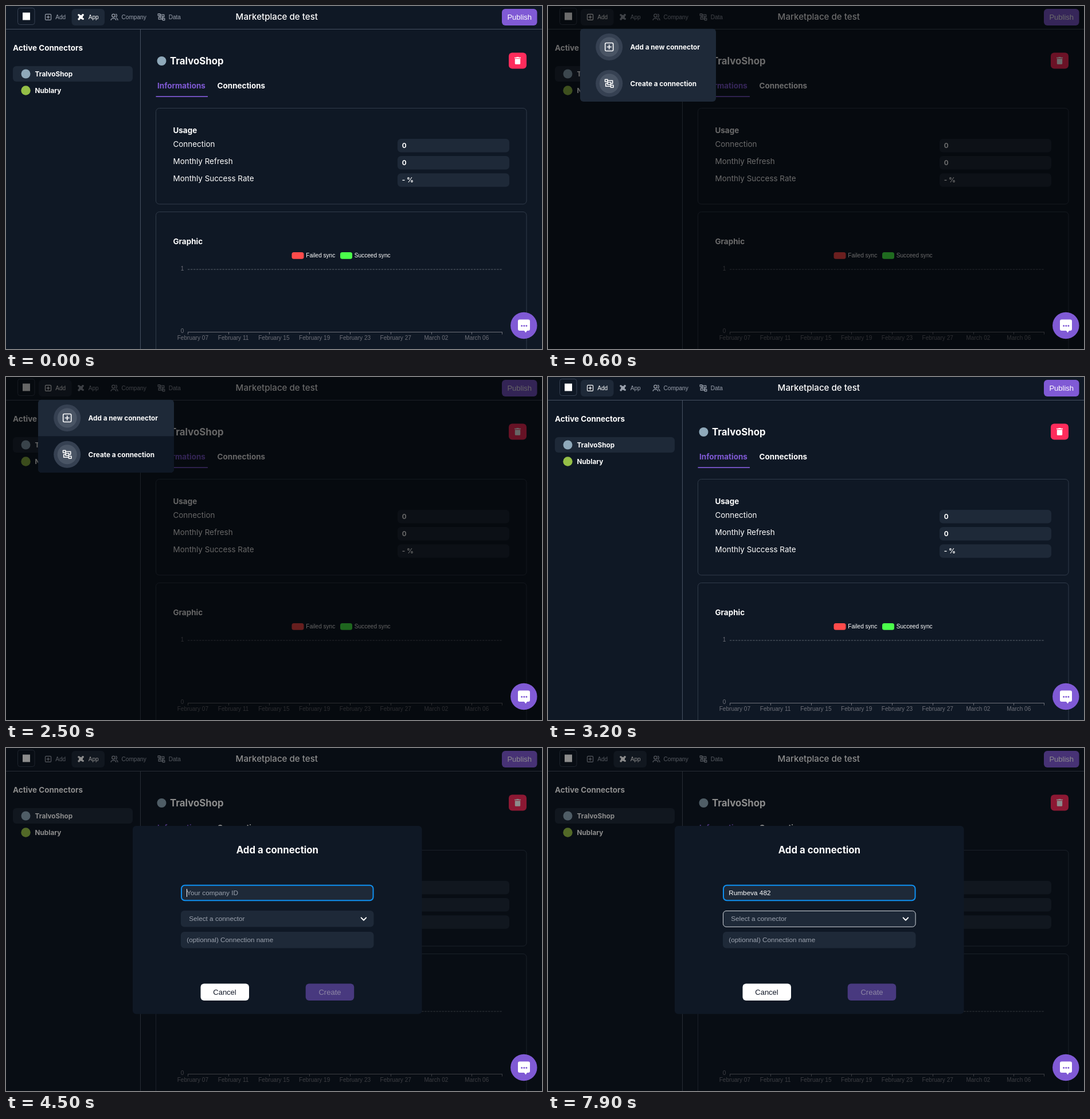
Write an HTML page that moves like this. It is 935 by 599 pixels and loops after 8000 ms.

```html
<!DOCTYPE html>
<html lang="en">
<head>
<meta charset="utf-8">
<title>Connector dashboard</title>
<style>
html, body { margin: 0; width: 100%; height: 100%; overflow: hidden; background: #0f1825; }
svg { display: block; }
text { fill: #fff; white-space: pre; font-family: Inter, sans-serif; font-size: 13.44px; }
.b { font-weight: 700; }
.s { font-size: 11.76px; }
.h { font-size: 16.8px; }
.a { font-family: "Liberation Sans", Arial, sans-serif; }
.t { font-size: 10.08px; }
.btn { font-size: 13px; text-anchor: middle; }
.ph { fill: #9ca3af; }
.axis { fill: #6e7079; }
.mid { text-anchor: middle; }
.end { text-anchor: end; }
.panel { fill: #1e2938; }
.card { fill: none; stroke: #303b4a; }
.line { fill: none; stroke: currentColor; stroke-linejoin: round; stroke-linecap: round; }
.nav text { fill: currentColor; }
</style>
</head>
<body>
<svg width="935" height="599" viewBox="0 0 935 599">
  <defs>
    <g id="plus" class="line">
      <rect x="1" y="1" width="14" height="14" rx="2"/>
      <path d="M8 4.5V11.5M4.5 8H11.5"/>
    </g>
    <g id="flow" class="line">
      <rect x="0.8" y="1" width="4.4" height="4"/>
      <rect x="5.4" y="6" width="5.4" height="4"/>
      <rect x="10.8" y="11" width="4.4" height="4"/>
      <path d="M5.4 3H14V8H11M10.6 13H2V8H5.2"/>
    </g>
    <clipPath id="menuClip"><rect x="56" y="39.5" width="237" height="127.5" rx="6"/></clipPath>
  </defs>

  <rect width="935" height="599" fill="#0f1825"/>
  <path d="M0 40.5H935M234.5 41V599" stroke="#465161" fill="none"/>

  <rect x="20.5" y="3.5" width="29.5" height="29" rx="4" fill="none" stroke="#364152"/>
  <rect x="29" y="11.5" width="13" height="13" fill="#fff"/>

  <rect id="tabBg" class="panel" y="5" width="57.5" height="29" rx="6"/>
  <g class="nav">
    <g id="navAdd">
      <use href="#plus" transform="translate(67.8 13.6) scale(.72)" stroke-width="1.6"/>
      <text class="a t" x="86.3" y="22.8">Add</text>
    </g>
    <g id="navApp">
      <g transform="translate(130.6 19.2)" fill="currentColor">
        <rect x="-3.4" y="-3.4" width="6.8" height="6.8" rx="1" transform="rotate(8)"/>
        <circle cx="-3.6" cy="-3.4" r="1.8"/><circle cx="3.4" cy="-3.6" r="1.9"/>
        <circle cx="3.6" cy="3.3" r="1.7"/><circle cx="-3.4" cy="3.6" r="1.9"/>
      </g>
      <text class="a t" x="143.8" y="22.8">App</text>
    </g>
    <g color="#9aa1ad">
      <g class="line" stroke-width="1.3">
        <circle cx="187.5" cy="16.8" r="2.7"/>
        <path d="M183.2 24.4C183.2 20.6 191.8 20.6 191.8 24.4M191.8 14.2A2.8 2.8 0 0 1 191.8 19.3M192.6 21Q195 22 195 24.4"/>
      </g>
      <text class="a t" x="201.6" y="22.8">Company</text>
      <use href="#flow" transform="translate(264.6 12.8) scale(.8)" stroke-width="1.6"/>
      <text class="a t" x="283.7" y="22.8">Data</text>
    </g>
  </g>
  <text x="400.6" y="24.4" style="font-size:15.12px;font-weight:500">Marketplace de test</text>
  <rect x="865" y="5" width="61.5" height="29" rx="6" fill="#805ad5"/>
  <text class="a btn" x="895.7" y="24">Publish</text>

  <text class="b" x="12" y="78">Active Connectors</text>
  <rect class="panel" x="12" y="105" width="209" height="27" rx="6"/>
  <circle cx="34.5" cy="118.5" r="8" fill="#8fa9ba"/>
  <text class="b s" x="50.6" y="123.2">TralvoShop</text>
  <circle cx="34.5" cy="147.5" r="8.2" fill="#95bf47"/>
  <text class="b s" x="50.6" y="152">Nublary</text>

  <circle cx="271.5" cy="96" r="8" fill="#8fa9ba"/>
  <text class="b h" x="286" y="102">TralvoShop</text>
  <rect x="877" y="81.5" width="31" height="28" rx="6" fill="#ff2c5c"/>
  <path d="M887 91.2V89.8H890L890.8 89H894.2L895 89.8H898V91.2ZM887.8 92.2H897.2V100.4Q897.2 101.8 895.8 101.8H889.2Q887.8 101.8 887.8 100.4Z" fill="#fff"/>

  <text class="b" x="264" y="143.8" style="fill:#805ad5">Informations</text>
  <text class="b" x="368.6" y="143.8">Connections</text>
  <rect x="261.5" y="157.3" width="90.5" height="1.7" fill="#805ad5"/>

  <rect class="card" x="261.5" y="178.5" width="646.5" height="167.5" rx="6"/>
  <text class="b" x="291.5" y="221.6">Usage</text>
  <g id="usage"></g>

  <rect class="card" x="261.5" y="359.5" width="646.5" height="260" rx="6"/>
  <text class="b" x="291.5" y="416">Graphic</text>
  <rect x="498.5" y="430" width="21" height="11.7" rx="3.5" fill="#ff4b4b"/>
  <text class="a t" x="523.3" y="438.7">Failed sync</text>
  <rect x="583" y="430" width="21" height="11.7" rx="3.5" fill="#4bff4b"/>
  <text class="a t" x="607.8" y="438.7">Succeed sync</text>
  <text class="a t axis end" x="310.3" y="462.3">1</text>
  <text class="a t axis end" x="310.3" y="571.3">0</text>
  <path d="M317 460H865.5" stroke="#5b626d" stroke-dasharray="3.36 1.68"/>
  <path id="axis" stroke="#6e7079" fill="none"/>
  <g id="dates"></g>

  <rect id="dim" width="935" height="599" fill="#000"/>

  <g id="menu" clip-path="url(#menuClip)">
    <rect class="panel" x="56" y="39.5" width="237" height="127.5"/>
    <rect id="rowHover" x="56" width="237" height="64" fill="#0f1825"/>
    <g fill="#364152"><circle cx="106.7" cy="71.5" r="23.5"/><circle cx="106.7" cy="135.3" r="23.5"/></g>
    <g fill="#4a5565"><circle cx="106.7" cy="71.5" r="17"/><circle cx="106.7" cy="135.3" r="17"/></g>
    <g color="#fff" stroke-width="1.6">
      <use href="#plus" transform="translate(98.7 63.5)"/>
      <use href="#flow" transform="translate(98.7 127.3)"/>
    </g>
    <text class="b s" x="143.6" y="76.3">Add a new connector</text>
    <text class="b s" x="143.6" y="140.1">Create a connection</text>
  </g>

  <g id="modal">
    <rect x="221" y="136" width="504.5" height="328.5" rx="6" fill="#0f1825"/>
    <text class="b h mid" x="473.4" y="184">Add a connection</text>
    <rect class="panel" x="305" y="238.8" width="336.5" height="28.4" rx="6"/>
    <rect class="panel" x="305" y="284" width="336.5" height="28.6" rx="6"/>
    <rect class="panel" x="305" y="321" width="336.5" height="28.4" rx="6"/>
    <rect id="ring" y="0" rx="6" fill="none"/>
    <rect id="selRing" x="305.5" y="284.5" width="335.6" height="27.8" rx="5.5" fill="none" stroke="#d1d5db"/>
    <text id="entry" class="a s" x="315.3" y="257.2"></text>
    <rect id="caret" y="246" width="1" height="14" fill="#fff"/>
    <text class="a s ph" x="319.2" y="302.4">Select a connector</text>
    <path d="M619.6 296.4L623.9 300.7L628.2 296.4" fill="none" stroke="#fff" stroke-width="2" stroke-linecap="round" stroke-linejoin="round"/>
    <text class="a s ph" x="315.3" y="339.3">(optionnal) Connection name</text>
    <rect x="339.5" y="411.5" width="84.5" height="29.5" rx="6" fill="#fff"/>
    <text class="a btn" x="381.5" y="431" style="fill:#111827">Cancel</text>
    <rect x="522.7" y="411.5" width="84.5" height="29.5" rx="6" fill="#48397f"/>
    <text class="a btn" x="565" y="431" style="fill:#8f88a6">Create</text>
  </g>

  <circle cx="903.3" cy="558" r="23.2" fill="#805ad5"/>
  <path d="M896 547.5H911Q914 547.5 914 550.5V564Q914 567 911 567H909L906.5 570.5L904 567H896Q893 567 893 564V550.5Q893 547.5 896 547.5Z" fill="#fff"/>
  <g fill="#805ad5"><circle cx="899.7" cy="558.4" r="1.5"/><circle cx="903.8" cy="558.4" r="1.5"/><circle cx="907.9" cy="558.4" r="1.5"/></g>
</svg>
<script>
const LOOP = 8000;
const NAME = "Rumbeva 482";
const KEYS = [5800, 5900, 6000, 6100, 6300, 6500, 6700, 6800, 7000, 7100, 7200];
const GREY = [154, 161, 173];
const $ = id => document.getElementById(id);
const set = (id, attrs) => {
  for (const k in attrs) $(id).setAttribute(k, attrs[k]);
};
const show = (id, on) => set(id, { visibility: on ? "visible" : "hidden" });
const within = (t, a, b) => t >= a && t < b;
const tone = k => `rgb(${GREY.map(c => Math.round(c + (255 - c) * k))})`;

// value of the last [time, value] step that has been reached
const stepAt = (t, steps) => steps.reduce((v, s) => t >= s[0] ? s[1] : v, 0);

const rows = [["Connection", "0"], ["Monthly Refresh", "0"], ["Monthly Success Rate", "- %"]];
$("usage").innerHTML = rows.map(([label, value], i) => {
  const y = 30.1 * i;
  return `<text x="291.5" y="${245.5 + y}">${label}</text>
    <rect class="panel" x="683" y="${232 + y}" width="195" height="23.5" rx="6"/>
    <text class="b s" x="690.8" y="${247.9 + y}">${value}</text>`;
}).join("");

const days = ["February 07", "February 11", "February 15", "February 19",
  "February 23", "February 27", "March 02", "March 06"];
const slot = 548.5 / 31;
$("dates").innerHTML = days.map((d, i) =>
  `<text class="a t axis mid" x="${317 + slot * (4 * i + 0.5)}" y="583">${d}</text>`).join("");
const ticks = days.map((d, i) => Math.round(317 + slot * 4 * i) + 0.5).concat(865.5);
set("axis", { d: "M317 569.5H866" + ticks.map(x => `M${x} 569V573.5`).join("") });

function draw(time) {
  const t = Math.floor(time / 100) * 100;
  const adding = within(t, 600, 3300);
  const menu = within(t, 600, 3200);
  const modal = t >= 3300;

  set("tabBg", { x: adding ? 57 : 114.5 });
  const hover = stepAt(t, [[100, 0.3], [200, 0.75], [300, 1], [3300, 0]]);
  set("navAdd", { color: tone(hover) });
  set("navApp", { color: tone(adding ? 0 : 1) });
  set("dim", { opacity: stepAt(t, [[600, 0.58], [700, 0.6], [3200, 0], [3300, 0.44], [3400, 0.45]]) });

  show("menu", menu);
  show("rowHover", menu && t >= 1100);
  set("rowHover", { y: t < 2500 ? 39.5 : 103.3 });

  show("modal", modal);
  const focus = t >= 4500;
  const w = focus ? 2 : 1;
  show("ring", t >= 4400);
  set("ring", {
    x: 305 + w / 2, y: 238.8 + w / 2, width: 336.5 - w, height: 28.4 - w,
    stroke: focus ? "#0e8ff0" : "#d1d5db", "stroke-width": w, opacity: focus ? 1 : 0.6
  });
  show("selRing", t >= 7800);
  set("selRing", { opacity: t >= 7900 ? 1 : 0.5 });

  const typed = NAME.slice(0, KEYS.filter(k => t >= k).length);
  const entry = $("entry");
  entry.textContent = typed || "Your company ID";
  entry.classList.toggle("ph", !typed);
  const end = 315.3 + (typed ? entry.getComputedTextLength() : 0);
  set("caret", { x: Math.floor(end) });
  show("caret", within(t, 4500, 5100) || within(t, 5600, 7800));
}

const start = performance.now();
function tick() {
  draw((performance.now() - start) % LOOP);
  requestAnimationFrame(tick);
}
tick();
</script>
</body>
</html>
```
